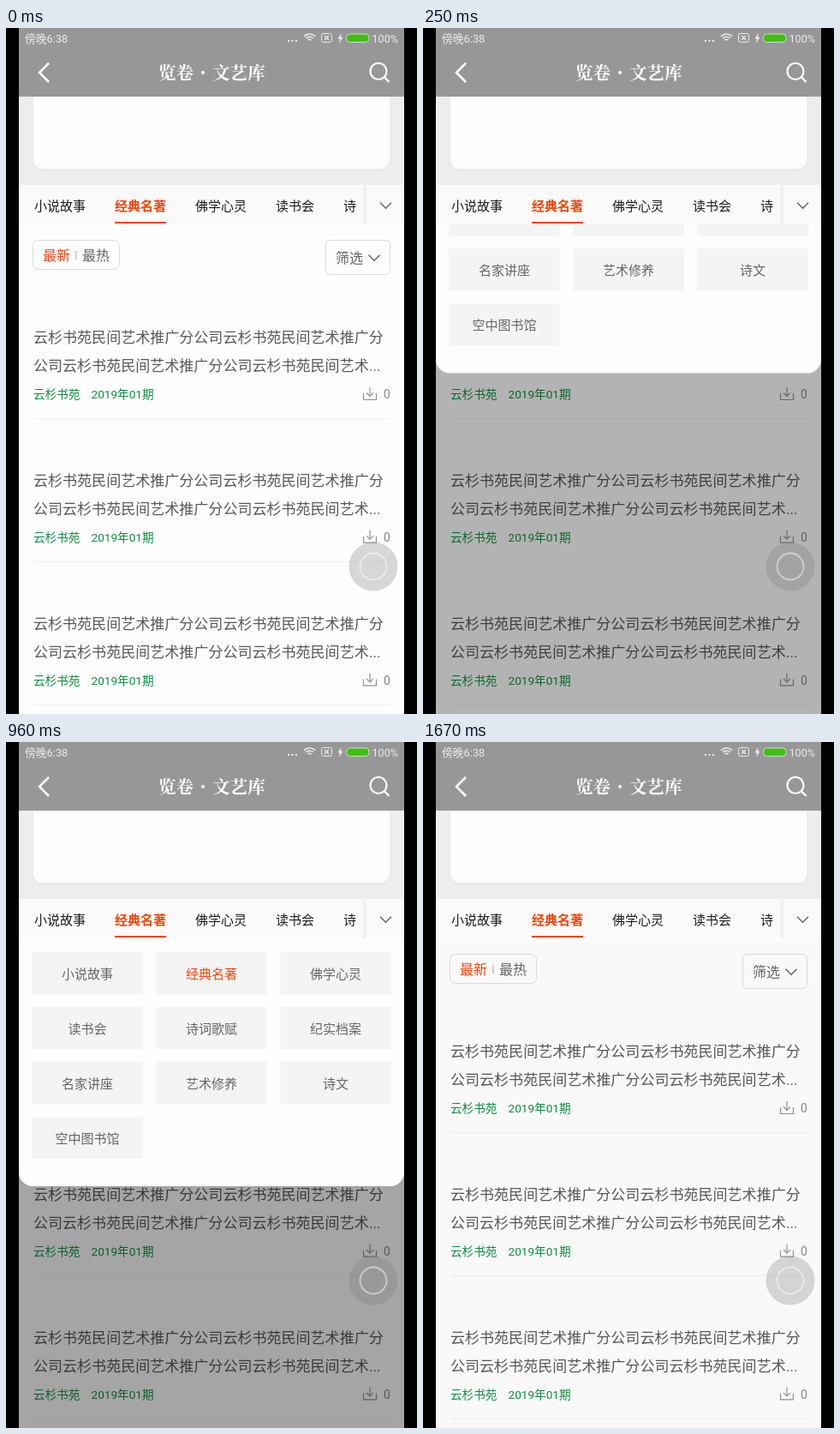
These frames come from a looping animation (480 by 800 pixels, 1.71 s). An HTML page with a canvas:

```html
<!DOCTYPE html>
<html lang="zh-CN">
<head>
<meta charset="utf-8">
<style>
  html, body { margin: 0; width: 100%; height: 100%; overflow: hidden; background: #000; }
  canvas { display: block; width: 480px; height: 800px; }
</style>
</head>
<body>
<canvas id="stage" width="480" height="800"></canvas>
<script>
const ctx = document.getElementById('stage').getContext('2d');
const LOOP = 1710;
const SANS = 'Roboto, "Noto Sans CJK SC", "Noto Sans CJK", sans-serif';
const SERIF = '"Noto Serif CJK SC", "Noto Serif", "Noto Sans CJK SC", serif';
const ORANGE = '#f2450c', GRAY = '#666', INK = '#585858', GREEN = '#0c9040', PAPER = '#fdfdfd';
const PUBLISHER = '云杉书苑';
const COMPANY = PUBLISHER + '民间艺术推广分公司';
const REPEATED = COMPANY.repeat(4);
const CATEGORIES = ['小说故事', '经典名著', '佛学心灵', '读书会', '诗词歌赋',
  '纪实档案', '名家讲座', '艺术修养', '诗文', '空中图书馆'];
const TAB_X = [33, 127, 221, 315, 394];

const clamp = v => Math.min(1, Math.max(0, v));
const ease = v => (1 - Math.cos(Math.PI * clamp(v))) / 2;

function rect(x, y, w, h, color) {
  ctx.fillStyle = color;
  ctx.fillRect(x, y, w, h);
}

function round(x, y, w, h, r, fill, stroke) {
  ctx.beginPath();
  ctx.roundRect(x, y, w, h, r);
  if (fill) { ctx.fillStyle = fill; ctx.fill(); }
  if (stroke) { ctx.strokeStyle = stroke; ctx.lineWidth = 1; ctx.stroke(); }
}

function line(points, color, width = 1) {
  ctx.beginPath();
  points.forEach(([x, y]) => ctx.lineTo(x, y));
  ctx.strokeStyle = color;
  ctx.lineWidth = width;
  ctx.stroke();
}

function circle(x, y, r, fill, stroke, width) {
  ctx.beginPath();
  ctx.arc(x, y, r, 0, Math.PI * 2);
  if (fill) { ctx.fillStyle = fill; ctx.fill(); }
  if (stroke) { ctx.strokeStyle = stroke; ctx.lineWidth = width; ctx.stroke(); }
}

// y is the visual middle of the glyphs
function text(str, x, y, size, color, { align = 'left', weight = 400, family = SANS } = {}) {
  ctx.font = `${weight} ${size}px ${family}`;
  ctx.textAlign = align;
  ctx.fillStyle = color;
  ctx.fillText(str, x, y + size * .38);
}

function chevron(x, y) {
  line([[x - 6.5, y - 3.2], [x, y + 3.3], [x + 6.5, y - 3.2]], GRAY, 1.5);
}

function drawFilters() {
  round(31.5, 247.5, 101, 34, 6, null, '#dcdcdc');
  text('最新', 43, 265, 16, ORANGE, { weight: 500 });
  line([[82, 260], [82, 270]], '#aaa');
  text('最热', 89, 265, 16, GRAY);
  round(373.5, 247.5, 75, 40, 5, null, '#dcdcdc');
  text('筛选', 385, 268, 16, GRAY);
  chevron(430, 268);
}

function drawItem(y) {
  text(REPEATED.slice(0, 24), 32, y, 17.05, INK);
  text(REPEATED.slice(24, 47), 32, y + 33, 17.05, INK);
  text('...', 424, y + 33, 17, INK);
  text(PUBLISHER, 32, y + 66, 13.6, GREEN);
  text('2019年01期', 99.5, y + 66, 13.6, GREEN);
  const c = '#929292';
  line([[417.5, y + 65], [417.5, y + 72.5], [432.5, y + 72.5], [432.5, y + 65]], c, 1.2);
  line([[425, y + 58], [425, y + 68]], c, 1.2);
  line([[421, y + 64.5], [425, y + 68.5], [429, y + 64.5]], c, 1.2);
  text('0', 441, y + 66, 13.8, '#888');
  rect(32, y + 94, 417, 1, '#f0f0f0');
}

function drawPanel(open) {
  if (open <= 0) return;
  ctx.save();
  ctx.beginPath();
  ctx.rect(15, 229, 450, 571);
  ctx.clip();
  ctx.translate(0, -288 * (1 - open));
  round(15, 229, 450, 289, [0, 0, 16, 16], PAPER);
  CATEGORIES.forEach((name, i) => {
    const col = i % 3, y = 245 + 64 * Math.floor(i / 3);
    rect(30 + col * 145 + (col ? .5 : 0), y, 129.5, 49, '#f4f4f4');
    text(name, 95 + col * 145, y + 25, 15, i === 1 ? ORANGE : GRAY, { align: 'center' });
  });
  ctx.restore();
}

function drawTabs() {
  rect(15, 80, 450, 103, '#ededed');
  round(31, 60, 418, 105, 12, PAPER, '#e2e2e2');
  rect(15, 183, 450, 46, '#fafafa');
  TAB_X.forEach((x, i) => {
    const name = i === 4 ? '诗' : CATEGORIES[i];
    text(name, x, 207, 15, i === 1 ? ORANGE : '#1c1c1c', { weight: i === 1 ? 700 : 400 });
  });
  rect(127, 226, 60, 2, ORANGE);
  rect(417, 184, 4, 45, '#f1f1f1');
  chevron(443.5, 207);
}

function drawStatus() {
  const c = '#ececec';
  text('傍晚6:38', 22, 12, 12.8, c);
  [330, 334.5, 339].forEach(x => rect(x - 1, 14, 2, 2, c));
  [9, 5.8, 2.6].forEach(r => {
    ctx.beginPath();
    ctx.arc(354.5, 16, r, -Math.PI * .76, -Math.PI * .24);
    ctx.strokeStyle = c;
    ctx.lineWidth = 1.6;
    ctx.stroke();
  });
  round(368.5, 6.5, 12, 10, 2, null, c);
  line([[372, 9], [377, 14]], c, 1.2);
  line([[377, 9], [372, 14]], c, 1.2);
  ctx.beginPath();
  [[391.5, 6], [387.5, 12.5], [390, 12.5], [389, 18], [393.5, 10.8], [391, 10.8]]
    .forEach(([x, y]) => ctx.lineTo(x, y));
  ctx.fillStyle = c;
  ctx.fill();
  round(397.5, 7, 26.5, 9.5, 4, '#43bd12', '#d4d8d0');
  text('100%', 427.5, 12, 12.6, c);
}

function drawHeader() {
  rect(15, 0, 450, 80, '#979797');
  drawStatus();
  line([[50, 41], [39, 52], [50, 63]], '#fff', 2.5);
  const style = { weight: 700, family: SERIF };
  text('览卷', 178, 52, 20.6, '#fff', style);
  circle(230, 52, 2, '#fff');
  text('文艺库', 241, 52, 20.6, '#fff', style);
  circle(435, 50.5, 9.5, null, '#fff', 2.2);
  line([[442, 57.5], [447.5, 63]], '#fff', 2.4);
}

function draw(t) {
  const closing = t > 1000;
  const open = closing ? 1 - ease((t - 1384) / 300) : ease((t - 82) / 300);
  const dim = closing ? 1 - clamp((t - 1384) / 300) : clamp((t - 42) / 250);

  rect(0, 0, 480, 800, '#000');
  rect(15, 0, 450, 800, PAPER);
  drawFilters();
  [361, 527.7, 694.4].forEach(drawItem);
  rect(15, 229, 450, 571, `rgba(0, 0, 0, ${.35 * dim})`);

  drawPanel(open);
  drawTabs();
  drawHeader();
  circle(429, 628, 28.5, 'rgba(127, 127, 127, .3)');
  circle(429, 628, 15.5, null, 'rgba(255, 255, 255, .5)', 1.8);
}

function tick() {
  draw(performance.now() % LOOP);
  requestAnimationFrame(tick);
}
tick();
</script>
</body>
</html>
```
